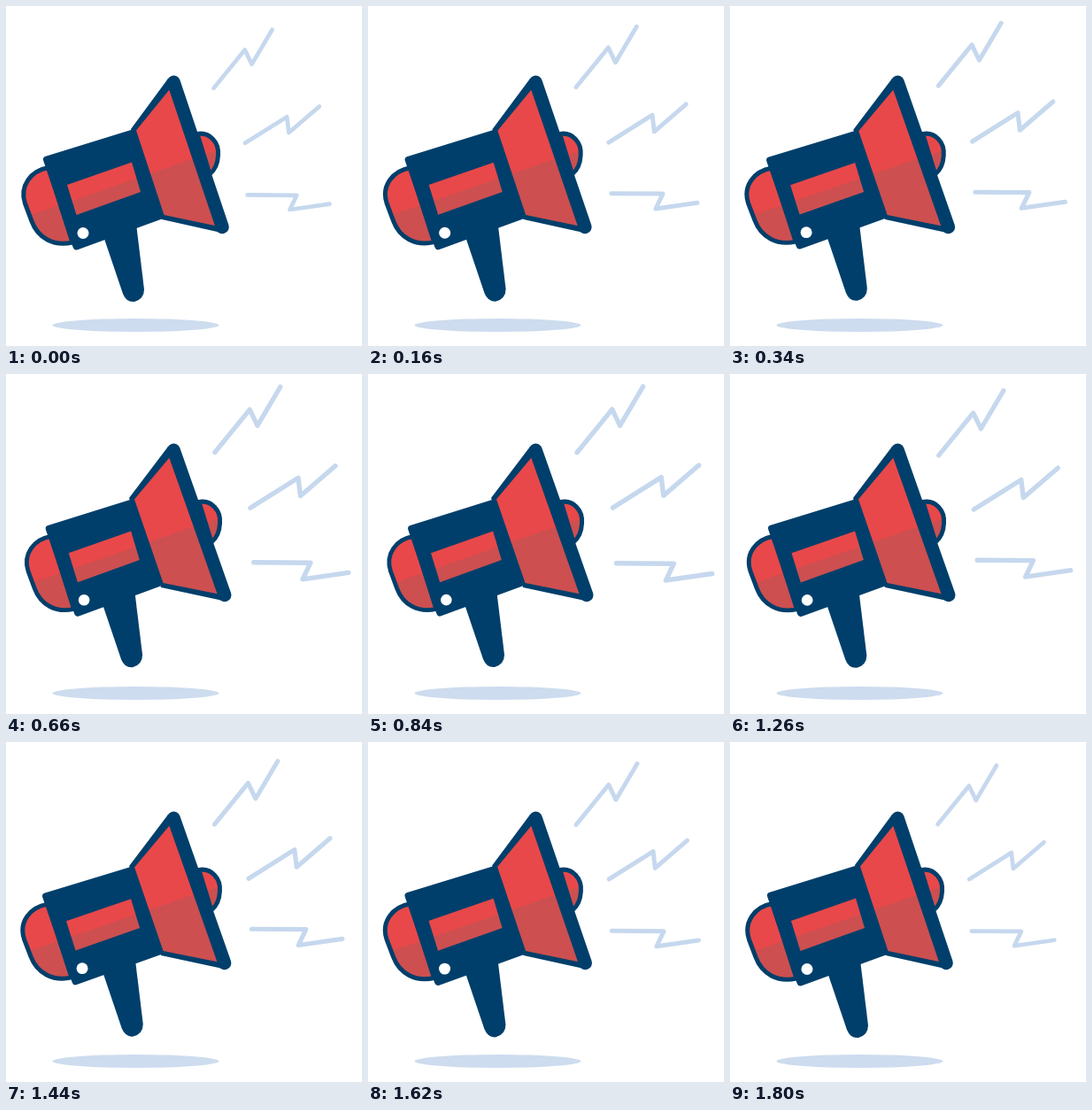
These frames come from a looping animation (402 by 384 pixels, 1820 ms). An HTML page:

```html
<!DOCTYPE html>
<html lang="en">
<head>
<meta charset="utf-8">
<title>Megaphone</title>
<style>
  html, body { margin: 0; width: 100%; height: 100%; overflow: hidden; background: #fff; }
  svg { display: block; width: 100vw; height: 100vh; }
  .navy { fill: #003f6b; }
  .red { fill: url(#shade); }
  .edge { stroke: #003f6b; stroke-width: 5; stroke-linejoin: round; }
  .bolts { fill: none; stroke: #c6d8ee; stroke-width: 4.7; stroke-linecap: round; stroke-linejoin: round; }
</style>
</head>
<body>
<svg viewBox="0 0 402 384">
  <defs>
    <linearGradient id="shade" gradientUnits="userSpaceOnUse" x1="89.5" y1="109.5" x2="154.5" y2="297.5">
      <stop offset=".5" stop-color="#e8484a"/>
      <stop offset=".5" stop-color="#cd4f50"/>
    </linearGradient>
    <path id="bolt" d="M0 0 L55.500 -5.700 L49.500 11.300 L93.500 0"/>
  </defs>
  <ellipse cx="146.5" cy="360.5" rx="94" ry="7.5" fill="#cddcee"/>

  <path id="handle" class="navy" d="M110 260 L132 325 Q136 335 145 334 Q156 331 156 320 L147 246 Z"/>
  <g id="back">
    <path class="red edge" d="M48 182.500 C28 186 15 203 21.500 223 L29 243 C36 262 54 272 75 267 Z"/>
    <path class="navy" stroke="#003f6b" stroke-width="8" stroke-linejoin="round" d="M46 173.500 L143 143.500 L174 237 L79.500 271.500 Z"/>
    <path class="red" d="M69 202 L142 176.500 L152 210 L79.500 236 Z"/>
    <circle cx="87" cy="256.500" r="6.500" fill="#fff"/>
  </g>
  <path id="bulge" class="red edge" d="M216 144.500 C230 142 241 154 239.500 169 C239 179 235 186 230 190 Z"/>
  <path id="hornEdge" class="navy"/>
  <path id="horn" class="red"/>
  <path id="bar" fill="none" stroke="#003f6b" stroke-width="15" stroke-linecap="round"/>

  <g class="bolts">
    <use href="#bolt"/>
    <use href="#bolt"/>
    <use href="#bolt"/>
  </g>
</svg>
<script>
const LOOP = 1820, STEP = 20;
const el = id => document.getElementById(id);
const boltShapes = document.querySelectorAll('use');

const bolts = [
  { x: 234.5, y: 91, angle: -45, grow: .13, reach: 1.5, sway: -2.5, cycles: 1, phase: 700 },
  { x: 270, y: 153, angle: -26.3, grow: .16, reach: 6.5, sway: -2, cycles: 1, phase: 800 },
  { x: 272.5, y: 212, angle: 6.2, grow: .165, reach: 8, sway: 1.8, cycles: 2, phase: 820 }
];

const smooth = (from, to, t) => {
  const k = Math.min(1, Math.max(0, (t - from) / (to - from)));
  return k * k * (3 - 2 * k);
};
const line = (...points) => 'M' + points.map(p => p.join(' ')).join('L');

function drawMegaphone(t) {
  const there = Math.min(t, LOOP - t);
  const flare = smooth(0, 440, there);
  const squeeze = smooth(400, 720, there);

  const sx = 1 - .04 * squeeze, sy = 1 - .02 * flare - .01 * squeeze;
  el('back').setAttribute('transform',
    `translate(${146 - flare} 212) scale(${sx} ${sy}) translate(-146 -212)`);
  el('handle').setAttribute('transform',
    `translate(${-1.3 * flare - .7 * squeeze} ${-1.5 * flare - 1.5 * squeeze})`);
  el('bulge').setAttribute('transform', `translate(${2 * flare} 0)`);

  el('hornEdge').setAttribute('d', line(
    [183, 82], [141 - 2 * flare, 139 + flare], [176 - flare, 241], [243 + 2 * flare, 256]));
  el('horn').setAttribute('d', line(
    [184.5, 94.5], [147 - 2 * flare, 140.5 + flare],
    [178.5 - flare, 236], [238 + 2 * flare, 248.5]));
  el('bar').setAttribute('d', line([189.3, 86], [244.3 + 2.7 * flare, 249.7]));
}

function drawBolts(t) {
  const swell = Math.sin(Math.PI * t / LOOP);
  bolts.forEach((b, i) => {
    const wave = Math.cos(2 * Math.PI * b.cycles * (t - b.phase) / LOOP);
    const x = b.x + b.reach * swell, y = b.y + b.sway * wave;
    boltShapes[i].setAttribute('transform',
      `translate(${x} ${y}) rotate(${b.angle}) scale(${1 + b.grow * swell})`);
  });
}

const start = performance.now();
function tick() {
  const now = (performance.now() - start) % LOOP;
  const t = Math.floor(now / STEP) * STEP;
  drawMegaphone(t);
  drawBolts(t);
  requestAnimationFrame(tick);
}
tick();
</script>
</body>
</html>
```
